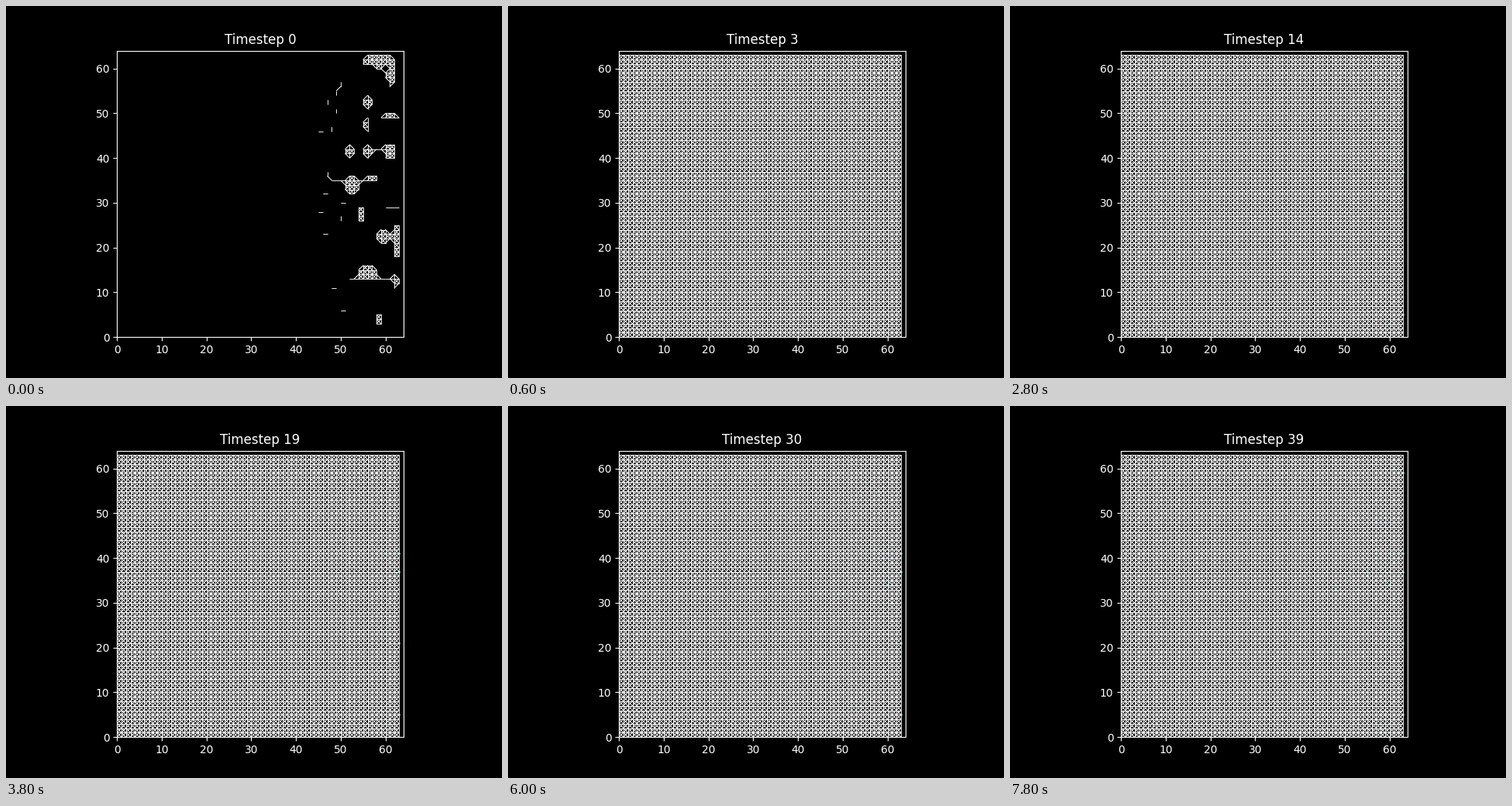
Recreate the animation shown at these times as a matplotlib script. Size 640 by 480 pixels, loop 8 s.

```python
import numpy as np
import matplotlib.pyplot as plt
from matplotlib.animation import FuncAnimation
from matplotlib.collections import LineCollection

N = 64
STEPS = 40
STEP_MS = 200
MARKS = 66
FIRST_MARK = 6

X, Y = np.mgrid[:N, :N]

# Ellipses (x, y, rx, ry) that are live at the start
CLUMPS = [
    (58.5, 61.8, 4, 1.9), (61.3, 58.8, 1.4, 3), (56, 52.5, 1.1, 1.6),
    (55.7, 47.5, 0.9, 1.6), (61, 49.3, 2.6, 0.8), (52, 41.5, 1.2, 1.6),
    (56, 41.3, 1.2, 2), (61.2, 41.3, 1.8, 2.3), (58, 42, 2.6, 0.4),
    (52.5, 34, 1.9, 2.1), (56.8, 35.2, 1.9, 1.2), (50, 35, 2.1, 0.4),
    (54.5, 27.5, 0.8, 3), (61.5, 29, 2.1, 0.9), (62.5, 21.5, 0.7, 5.2),
    (59.6, 22.6, 1.8, 1.8), (56, 14.5, 2.2, 1.7), (57.5, 13, 5.6, 0.4),
    (62.2, 12.7, 1.1, 1.8), (58.5, 4, 0.7, 2.1),
]
# Round pits (x, y, r) left after the first step
PITS = [
    (9, 51.5, 1.2), (14, 50.5, 0.6), (10.5, 42.3, 1.1), (6.5, 41, 0.8),
    (14.4, 38.3, 0.8), (6.5, 33, 0.6), (14, 29.2, 1.1), (20.6, 19.7, 0.8),
    (11, 19.3, 1.1), (13, 20.6, 0.9), (13.5, 15, 0.6), (7, 11.5, 1.2),
    (8.7, 10, 0.8), (11, 10.5, 0.6), (9, 60, 0.5), (21, 51, 0.5),
    (29, 57, 0.5), (41, 55, 0.5), (30, 28, 0.5),
]


def ellipses(shapes):
    mask = np.zeros((N, N), bool)
    for x, y, rx, ry in shapes:
        mask |= ((X - x) / rx) ** 2 + ((Y - y) / ry) ** 2 <= 1
    return mask


def opening(rng):
    """Live clumps near the right edge, with short stray dashes."""
    grid = ellipses(CLUMPS)
    for i in range(14):
        x, y = rng.integers(45, 51), rng.integers(2, 58)
        grid[x, y] = True
        grid[x + i % 2, y + 1 - i % 2] = True
    return grid


def first_spread():
    """Full lattice with a wavy left shore and a few pits."""
    wave = 2.4 * np.cos(2 * np.pi * (Y - 4) / 8.1)
    swell = 1.8 * np.cos(2 * np.pi * (Y - 60) / 16)
    shore = X < 1.6 + wave + swell
    return ~(shore | ellipses((x, y, r, r) for x, y, r in PITS))


def links(grid):
    """Segments from every live node to each of its live neighbours."""
    padded = np.pad(grid, 1)
    parts = []
    for dx in (-1, 0, 1):
        for dy in (-1, 0, 1):
            if dx or dy:
                near = padded[1 + dx:1 + dx + N, 1 + dy:1 + dy + N]
                a = np.argwhere(grid & near)
                parts.append(np.stack([a, a + (dx, dy)], axis=1))
    return np.concatenate(parts)


rng = np.random.default_rng(4)
grids = [opening(rng), first_spread(), np.ones((N, N), bool)]

# Marks start at the right edge and reach further left as they multiply
reach = 20 * np.sqrt(np.arange(MARKS) / MARKS)
mark_x = N - 1 - np.floor(reach * rng.random(MARKS))
mark_y = rng.integers(0, N, MARKS)

plt.style.use("dark_background")
fig, ax = plt.subplots(figsize=(6.4, 4.8), dpi=100)
ax.set_aspect("equal")
ax.set_xlim(0, N)
ax.set_ylim(0, N)
title = ax.set_title("Timestep 0")

nets = [LineCollection(links(g), colors="white", linewidths=0.5, zorder=2)
        for g in grids]
for net in nets:
    ax.add_collection(net, autolim=False)
dots, = ax.plot([], [], "o", color="cyan", markersize=1, zorder=1)


def update(step):
    title.set_text(f"Timestep {step}")
    for i, net in enumerate(nets):
        net.set_visible(i == min(step, len(nets) - 1))
    growth = max(0, step - FIRST_MARK) / (STEPS - 1 - FIRST_MARK)
    count = round(MARKS * growth ** 2)
    dots.set_data(mark_x[:count], mark_y[:count])
    return [title, dots, *nets]


anim = FuncAnimation(fig, update, frames=STEPS, interval=STEP_MS,
                     init_func=lambda: update(0), repeat=True,
                     repeat_delay=0, blit=False)
plt.show()
```
